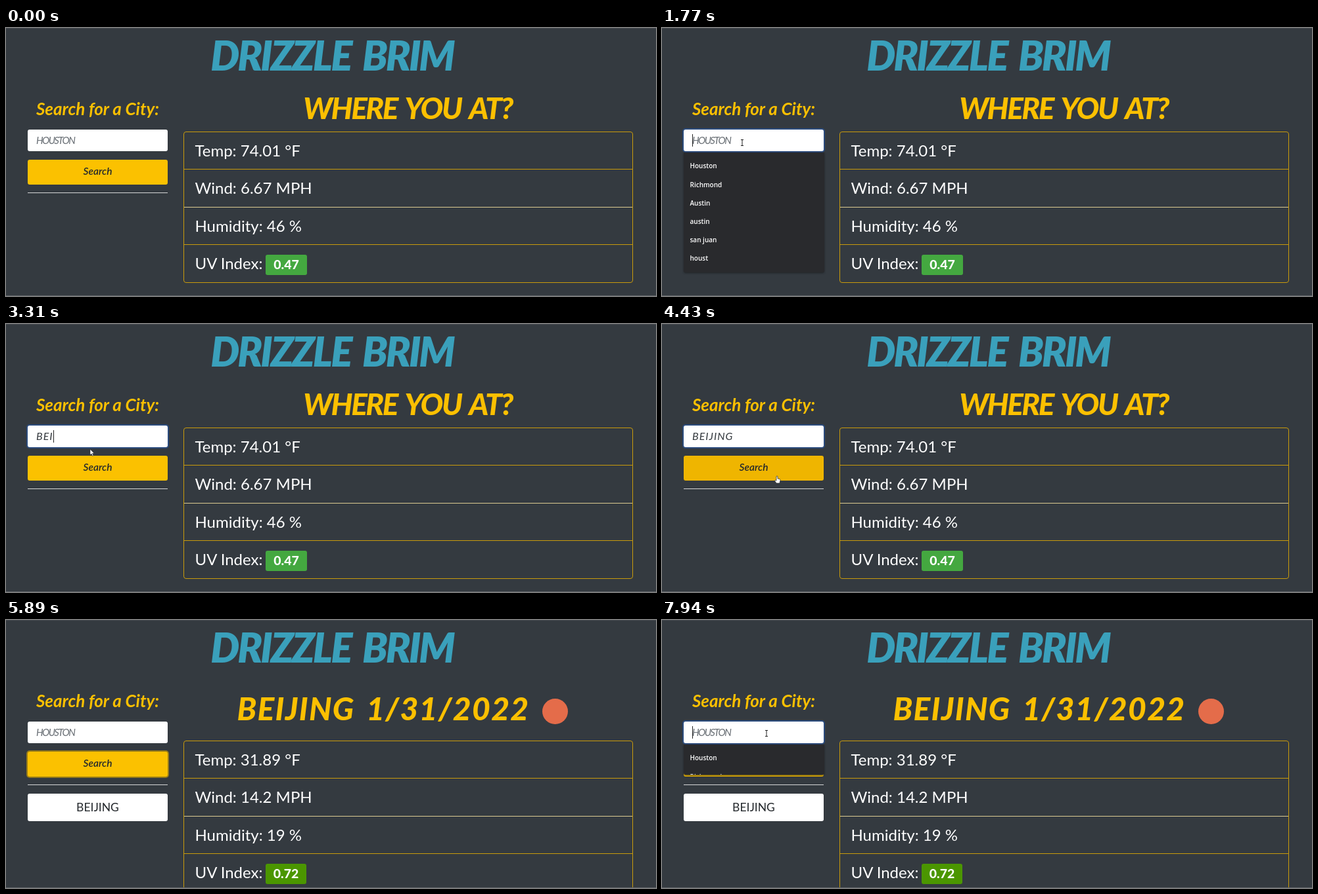
Write an HTML page that moves like this. It is 989x409 px and loops after 8000 ms.

```html
<!DOCTYPE html>
<html lang="en">
<head>
<meta charset="utf-8">
<title>Drizzle Brim</title>
<style>
  html, body { margin: 0; width: 100%; height: 100%; overflow: hidden; background: #343a40; }
  #stage {
    position: relative; width: 989px; height: 409px; overflow: hidden;
    box-sizing: border-box; background: #343a40; color: #fff;
    font-family: Lato, "Open Sans", sans-serif;
  }
  #stage::after {
    content: ""; position: absolute; inset: 0; pointer-events: none;
    box-shadow: inset 0 1px #454a50, inset 0 -1px #5e6267;
  }
  #stage > * { position: absolute; margin: 0; white-space: nowrap; box-sizing: border-box; }
  [hidden] { display: none !important; }

  h1, h2, h3 { text-align: center; color: #fcc000; }
  h1 { left: 296px; top: 11px; width: 400px; color: #3aa0bb; font: italic 900 62px/60px Lato, sans-serif; letter-spacing: -3px; word-spacing: 8px; }
  h2 { left: 411px; top: 92px; width: 400px; font: italic 800 46px/60px Lato, sans-serif; letter-spacing: -2.5px; word-spacing: 6px; }
  .done h2 { left: 324px; top: 105px; width: 500px; font-size: 48px; letter-spacing: 1.3px; }
  h3 { left: 33px; top: 108px; width: 213px; font: italic 700 26px/30px Lato, sans-serif; }

  #sun { left: 816px; top: 120px; width: 39px; height: 39px; border-radius: 50%; background: #e46c4a; }

  #field {
    left: 33px; top: 155px; width: 213px; height: 33px; padding-left: 13px;
    border-radius: 3px; background: #fff; color: #33383d;
    font: italic 16px/32px Lato, sans-serif; letter-spacing: 1px;
  }
  #field.empty { color: #686e74; letter-spacing: -1.6px; font-size: 15px; }
  #field.focus { box-shadow: 0 0 0 2px #2b4b7d; }
  #caret { display: inline-block; width: 1px; height: 19px; margin-right: -1px; vertical-align: -4px; background: #222; }

  .button { left: 33px; width: 213px; border-radius: 3px; text-align: center; color: #24282c; }
  #search { top: 201px; height: 38px; background: #fbc100; font: italic 600 15.5px/35px Lato, sans-serif; }
  #search.hover { background: #efb500; }
  #search.focus { box-shadow: 0 0 0 2px #987c18; }
  #past { top: 265px; height: 42px; background: #fff; font: 17.5px/41px Lato, sans-serif; }
  #rule { left: 33px; top: 251px; width: 213px; height: 1px; background: #d5d6d7; }

  #list {
    left: 33px; top: 190px; width: 214px; padding: 6.4px 0 0 9.5px; overflow: hidden;
    background: #292a2d; box-shadow: 0 1px 3px #202326; border-radius: 0 0 3px 3px;
    font: 600 10px/28.2px "Open Sans", sans-serif;
  }

  #card { left: 270px; top: 158px; width: 684px; height: 231px; border: 1px solid #c99b0c; border-radius: 4px; }
  .done #card { top: 184px; }
  .row { height: 57.3px; padding-left: 16.5px; box-sizing: border-box; border-bottom: 1px solid #c99b0c; font-size: 24px; line-height: 55px; }
  .row:nth-child(2) { border-color: #dccb92; }
  .row:last-child { border: 0; }
  #uv {
    position: absolute; left: 124px; top: 187px; width: 63px; height: 31px; border-radius: 3px;
    background: #44a840; text-align: center; font-weight: 800; font-size: 19.5px; line-height: 29px;
  }
  #uv.late { width: 62px; background: #4b9600; }

  #cursor { left: 0; top: 0; width: 0; height: 0; animation: travel 8s infinite ease-in-out; }
  #cursor svg { position: absolute; left: 0; top: 0; overflow: visible; width: 1px; height: 1px; }
  @keyframes travel {
    0%, 3.875% { transform: translate(790px, 260px); }
    7.25%, 10.5% { transform: translate(685px, 208px); }
    18.75% { transform: translate(126px, 176px); }
    20.5%, 22.2% { transform: translate(122px, 175px); }
    25.4%, 52.1% { transform: translate(128px, 191px); }
    55.4% { transform: translate(175px, 232px); }
    58.8%, 63.8% { transform: translate(168px, 222px); }
    66.2%, 73.6% { transform: translate(1000px, 300px); }
    81.9%, 83.6% { transform: translate(162px, 168px); }
    86.9%, 96.7% { transform: translate(158px, 176px); }
    98.5%, 100% { transform: translate(159px, 173px); }
  }
</style>
</head>
<body>
<div id="stage">
  <h1>DRIZZLE BRIM</h1>
  <h3>Search for a City:</h3>
  <div id="field"><span id="caret"></span><span id="value">HOUSTON</span></div>
  <div id="search" class="button">Search</div>
  <div id="rule"></div>
  <div id="past" class="button" hidden>BEIJING</div>

  <h2 id="place">WHERE YOU AT?</h2>
  <div id="sun" hidden></div>
  <div id="card">
    <div class="row">Temp: <span id="temp"></span> °F</div>
    <div class="row">Wind: <span id="wind"></span> MPH</div>
    <div class="row">Humidity: <span id="humidity"></span> %</div>
    <div class="row">UV Index: <span id="uv"></span></div>
  </div>

  <div id="list" hidden><div>Houston</div><div>Richmond</div><div>Austin</div><div>austin</div><div>san juan</div><div>houst</div></div>

  <div id="cursor">
    <svg id="arrow"><path d="M0 0V9L2 7L3.6 10.4L5 9.8L3.5 6.4H6.2Z" fill="#fff" stroke="#22262a" stroke-width=".6"/></svg>
    <svg id="beam"><path d="M-2-4.5H2M-2 4.5H2M0-4.5V4.5" fill="none" stroke="#222" stroke-width="1"/></svg>
    <svg id="hand"><path d="M-1 .6Q0-.6 1 .6V4L4 4.6Q5.2 5 5 6.4L4 11H-1L-3.6 7Q-3.4 5.5-1 7Z" fill="#fff" stroke="#22262a" stroke-width=".7"/></svg>
  </div>
</div>
<script>
  const LOOP = 8000;
  const $ = id => document.getElementById(id);
  const between = (t, a, b) => t >= a && t < b;
  const show = (id, on) => $(id).toggleAttribute("hidden", !on);
  const write = (id, text) => { if ($(id).textContent !== text) $(id).textContent = text; };

  // [time, number of letters typed]
  const keys = [[2700, 1], [2960, 2], [3310, 3], [3380, 4], [3570, 6], [3700, 7]];
  const FOCUS = 1500, BLUR = 5030, RESULT = 5100, UV = 5560, REFOCUS = 7880;

  function listHeight(t) {
    if (between(t, 1640, 1770) || t >= 7940) return 46;
    return between(t, 1770, 2700) ? 183 : 0;
  }

  function cursorShape(t) {
    if (t < 310 || between(t, 5290, 5890)) return "";
    if (between(t, 1280, 1930) || t >= 6300) return "beam";
    return between(t, 4230, 5110) ? "hand" : "arrow";
  }

  function render(t) {
    const done = t >= RESULT;
    const focused = between(t, FOCUS, BLUR) || t >= REFOCUS;
    const last = keys.filter(k => k[0] <= t).pop();
    const typed = last && !done ? "BEIJING".slice(0, last[1]) : "";
    const since = t >= REFOCUS ? REFOCUS : last ? last[0] : FOCUS;

    $("stage").classList.toggle("done", done);
    $("field").classList.toggle("focus", focused);
    $("field").classList.toggle("empty", !typed);
    write("value", typed || "HOUSTON");
    $("value").before($("caret"));
    if (typed) $("value").after($("caret"));
    show("caret", focused && (t - since) % 1060 < 530);

    $("search").classList.toggle("hover", cursorShape(t) === "hand");
    $("search").classList.toggle("focus", between(t, BLUR, REFOCUS));

    const height = listHeight(t);
    show("list", height);
    $("list").style.height = height + "px";

    show("past", done);
    show("sun", done);
    write("place", done ? "BEIJING 1/31/2022" : "WHERE YOU AT?");
    write("temp", done ? "31.89" : "74.01");
    write("wind", done ? "14.2" : "6.67");
    write("humidity", done ? "19" : "46");
    write("uv", t >= UV ? "0.72" : "0.47");
    $("uv").classList.toggle("late", t >= UV);

    for (const id of ["arrow", "beam", "hand"])
      $(id).style.display = cursorShape(t) === id ? "block" : "none";
  }

  let start;
  function tick(now) {
    start ??= now;
    render((now - start) % LOOP);
    requestAnimationFrame(tick);
  }
  render(0);
  requestAnimationFrame(tick);
</script>
</body>
</html>
```
